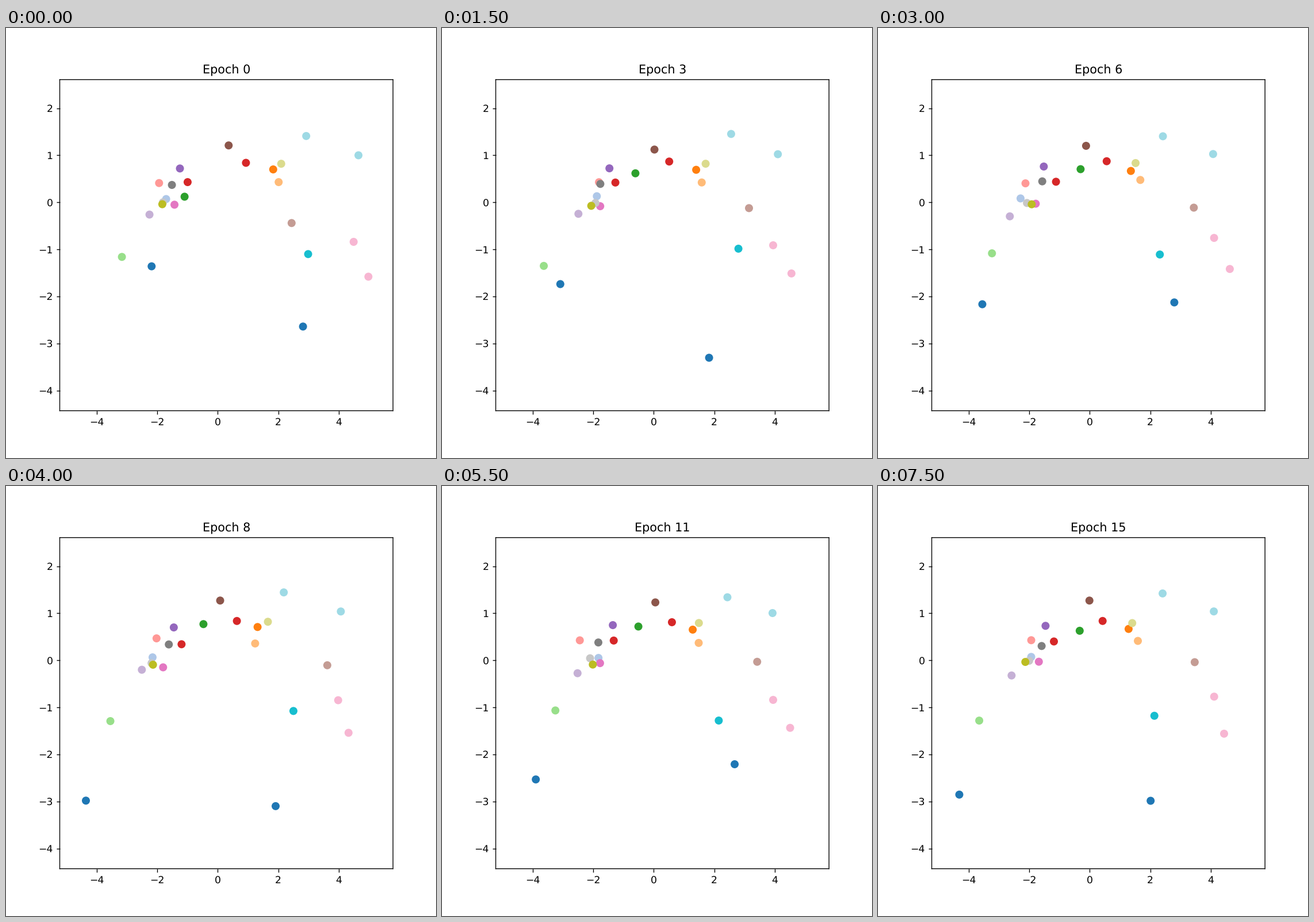
A matplotlib script for the animation above (8 s loop, 748 by 748 pixels).

```python
import numpy as np
import matplotlib.pyplot as plt
from matplotlib.animation import FuncAnimation

SIZE = 748
EPOCHS = 16

# Where each dot settles, in drawing order, which is also the colour order.
home = np.array([
    (-3.92, -2.47), (2.28, -2.64), (-1.99, 0.07), (1.35, 0.70),
    (1.52, 0.43), (-0.44, 0.72), (-3.37, -1.16), (-1.32, 0.43),
    (0.50, 0.84), (-2.21, 0.41), (-1.56, 0.72), (-2.51, -0.26),
    (-0.04, 1.21), (3.44, -0.07), (-1.73, -0.05), (3.86, -0.84),
    (4.32, -1.58), (-1.81, 0.37), (-2.09, 0.00), (-2.11, -0.04),
    (1.60, 0.82), (2.44, -1.10), (2.38, 1.41), (4.01, 1.00),
])

# Dots start a little to the right of home, apart from three stragglers.
start = home.copy()
start[:, 0] += 0.4 + 0.06 * home[:, 0]
start[[0, 5, 13]] = (-2.19, -1.36), (-1.10, 0.12), (2.44, -0.44)

# Low dots sway further, and more along the slope of the arch.
depth = np.maximum(-home[:, 1], 0)


def positions(epoch):
    """Ease from start to home, with a seeded sway that grows in."""
    left = np.exp(-epoch / 2)
    rng = np.random.default_rng(epoch)
    slide = rng.normal(size=len(home)) * (0.13 + 0.06 * depth)
    lift = 0.45 * depth * slide + rng.normal(scale=0.04, size=len(home))
    sway = np.column_stack([slide, lift])
    return home + (start - home) * left + sway * (1 - left)


plt.rcParams["text.hinting"] = "none"
fig, ax = plt.subplots(figsize=(6, 6), dpi=SIZE / 6)
dots = ax.scatter(*start.T, c=np.arange(len(home)), cmap="tab20", s=50)
ax.set_xlim(-5.228, 5.793)
ax.set_ylim(-4.429, 2.609)
ax.set_xticks(range(-4, 5, 2))
ax.set_yticks(range(-4, 3))
title = ax.set_title("Epoch 0")

# Soft, unsnapped frame lines.
for line in [*ax.spines.values(), *ax.get_xticklines(), *ax.get_yticklines()]:
    line.set_snap(False)


def update(epoch):
    dots.set_offsets(positions(epoch))
    title.set_text(f"Epoch {epoch}")
    return dots, title


anim = FuncAnimation(fig, update, frames=EPOCHS, interval=500, repeat=True)
plt.show()
```
